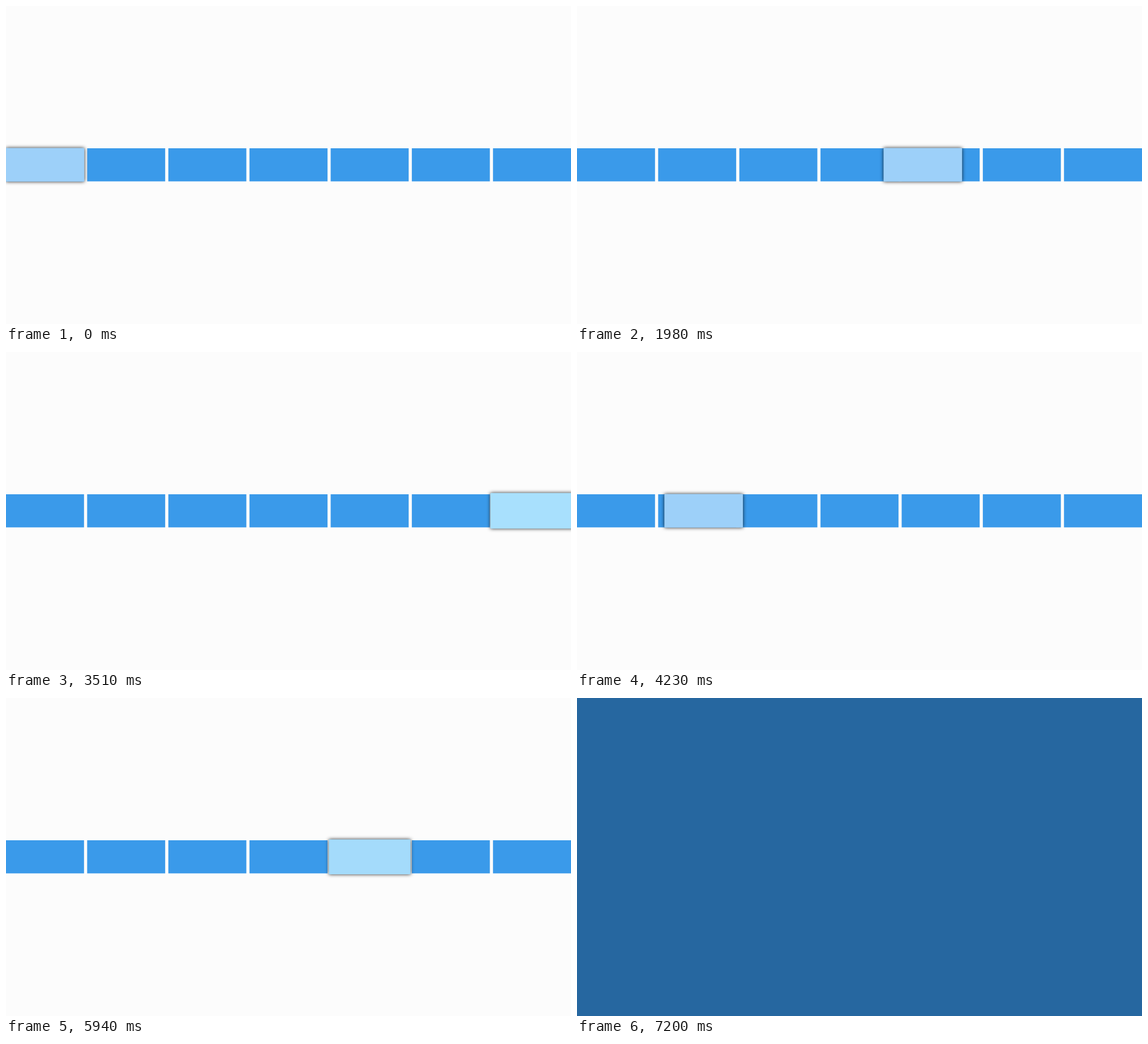
Animation, 998 px wide and 561 px high, one loop 7.23 s. Source, as an HTML page with a canvas:

```html
<!DOCTYPE html>
<html lang="en">
<head>
<meta charset="utf-8">
<title>Stepping highlight</title>
<style>
html, body { margin: 0; width: 100%; height: 100%; overflow: hidden; background: #fcfcfc; }
canvas { display: block; }
</style>
</head>
<body>
<canvas id="stage" width="998" height="561"></canvas>
<script>
const W = 998, H = 561, LOOP = 7230, TICK = 30;
const STEP = 600, STEPS = 6;
const TILES = 7, PITCH = 143.37, TILE_W = 137.8, TILE_Y = 251, TILE_H = 58.4;
const ctx = document.getElementById('stage').getContext('2d');

const clamp = v => Math.max(0, Math.min(1, v));
const mix = (a, b, k) => a.map((v, i) => Math.round(v + (b[i] - v) * k));

// Short ramp up, steady speed, longer ramp down; f is in ticks.
function travel(f) {
  const up = 0.86, down = 2.86, end = 9;
  const v = 1 / (end - (up + down) / 2);
  if (f <= 0) return 0;
  if (f >= end) return 1;
  if (f < up) return v * f * f / (2 * up);
  if (f > end - down) return 1 - v * (end - f) ** 2 / (2 * down);
  return v * (f - up / 2);
}

// Linear rise and fall around tick 15.
const pulse = f => clamp(1 - Math.abs(f - 15) / 5);

function drawTiles() {
  ctx.fillStyle = '#3a9aea';
  for (let i = 0; i < TILES; i++) ctx.fillRect(i * PITCH, TILE_Y, TILE_W, TILE_H);
}

function drawMarker(t) {
  const f = (t % STEP) / TICK;
  const pos = Math.floor(t / STEP) % STEPS + travel(f);
  const grow = pulse(f), scale = 1 + 0.1 * grow;
  const w = (TILE_W + 1) * scale, h = (TILE_H + 0.8) * scale;
  const cx = pos * PITCH + TILE_W / 2, cy = TILE_Y + TILE_H / 2;
  ctx.save();
  ctx.shadowColor = 'rgba(0,0,0,0.85)';
  ctx.shadowBlur = 6;
  ctx.fillStyle = `rgb(${mix([157, 208, 249], [175, 235, 255], grow)})`;
  ctx.beginPath();
  ctx.roundRect(cx - w / 2, cy - h / 2, w, h, 1.5);
  ctx.fill();
  ctx.restore();
}

function draw(now) {
  const t = Math.floor((now % LOOP) / TICK) * TICK;
  ctx.fillStyle = '#fcfcfc';
  ctx.fillRect(0, 0, W, H);
  drawTiles();
  drawMarker(t);
  const fade = clamp((t - 6750) / 450);
  if (fade > 0) {
    ctx.globalAlpha = fade;
    ctx.fillStyle = '#2667a0';
    ctx.fillRect(0, 0, W, H);
    ctx.globalAlpha = 1;
  }
}

const start = performance.now();
function loop() {
  draw(performance.now() - start);
  requestAnimationFrame(loop);
}
loop();
</script>
</body>
</html>
```
